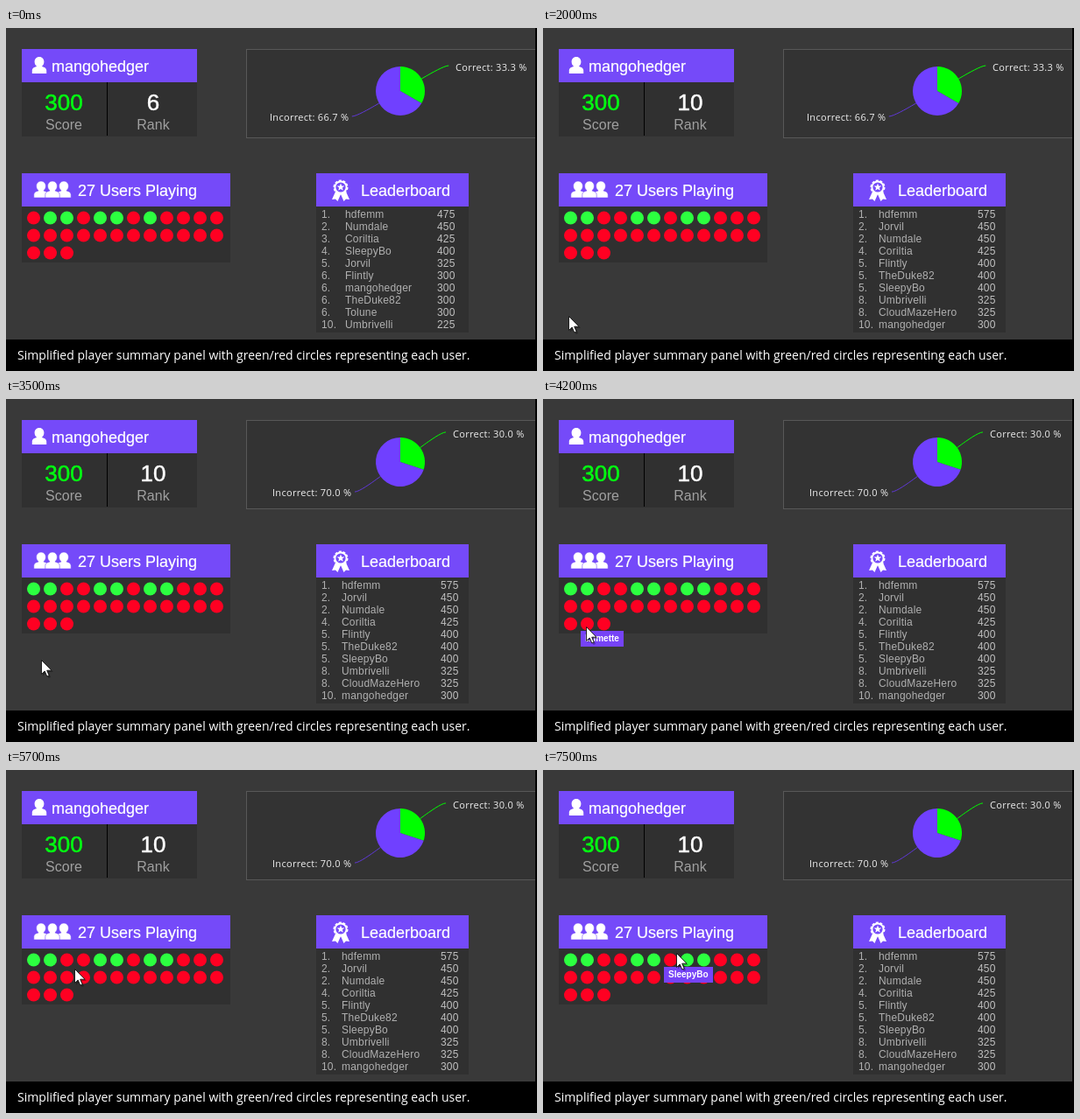
These frames come from a looping animation (606 px wide and 392 px high, 7.6 s). An HTML page:

```html
<!DOCTYPE html>
<html lang="en">
<head>
<meta charset="utf-8">
<title>Player summary panel</title>
<style>
  html, body { margin: 0; width: 100%; height: 100%; overflow: hidden; background: #393939; }
  #stage { position: relative; width: 606px; height: 392px; overflow: hidden; }
  svg { position: absolute; left: 0; top: 0; display: block; }
  text { font-family: "Liberation Sans", Arial, sans-serif; white-space: pre; }
  .head { fill: #754af9; }
  .body { fill: #303030; }
  .title { font-size: 18px; fill: #fff; stroke: #fff; stroke-width: .2px; }
  .big { font-size: 26px; text-anchor: middle; stroke-width: .5px; }
  .small { font-size: 16px; fill: #a0a0a0; text-anchor: middle; }
  .row { font-size: 12px; letter-spacing: .2px; fill: #b0b0b0; }
  .score { fill: #c0c0c0; }
  .label { font: 11px "Open Sans", sans-serif; letter-spacing: .3px; fill: #eee; }
  .caption { font: 14px "Open Sans", sans-serif; letter-spacing: .015px; fill: #fff; }
  #tip {
    position: absolute; height: 18px; padding: 0 5px; background: #7643f7; color: #fff;
    font: bold 10px/18px "Liberation Sans", Arial, sans-serif; white-space: nowrap;
  }
</style>
</head>
<body>
<div id="stage">
  <svg width="606" height="392">
    <defs>
      <path id="person" d="M0 0c3.400 0 5.400 2.600 5.400 5.600 0 2.300-1 4.300-2.500 5.300 3 .7 5.300 1.900 5.300 4.600V19H-8.200V15.500c0-2.700 2.300-3.900 5.300-4.600C-4.400 9.900-5.400 7.900-5.400 5.600-5.400 2.600-3.400 0 0 0z"/>
    </defs>
    <rect width="606" height="392" fill="#393939"/>

    <rect class="body" x="18" y="62" width="200" height="62"/>
    <rect class="head" x="18" y="24" width="200" height="38"/>
    <use href="#person" x="38" y="33" fill="#fff"/>
    <text class="title" x="52" y="50">mangohedger</text>
    <rect x="115" y="62" width="1" height="61" fill="#000"/>
    <text class="big" x="66" y="94" fill="#0f1" stroke="#0f1">300</text>
    <text class="small" x="66" y="116">Score</text>
    <text class="big" id="rank" x="168" y="94" fill="#fff" stroke="#fff"></text>
    <text class="small" x="168" y="116">Rank</text>

    <rect x="274.500" y="24.500" width="334" height="101" fill="#333" stroke="#585858"/>
    <g id="pie"><path fill="#0f0"/><path fill="#7040ff"/></g>
    <g id="labels"></g>

    <rect class="body" x="18" y="204" width="238" height="64"/>
    <rect class="head" x="18" y="166" width="238" height="38"/>
    <g fill="#fff" stroke="#754af9" stroke-width=".6">
      <use href="#person" x="40" y="175"/>
      <use href="#person" x="66" y="175"/>
      <use href="#person" x="53" y="175"/>
    </g>
    <text class="title" x="82" y="192">27 Users Playing</text>
    <g id="dots"></g>

    <rect class="body" x="354" y="204" width="174" height="144"/>
    <rect class="head" x="354" y="166" width="174" height="38"/>
    <path fill="#fff" d="M376 187l-4 9 4-.5 2.500 2.500 3.500-8 3.500 8 2.500-2.500 4 .5-4-9z"/>
    <circle cx="382" cy="182" r="7.500" fill="#fff" stroke="#fff" stroke-width="2" stroke-dasharray="3 1.700"/>
    <circle cx="382" cy="182" r="5.600" fill="#754af9"/>
    <path id="star" fill="#fff"/>
    <text class="title" x="405" y="192">Leaderboard</text>
    <g id="board"></g>
  </svg>
  <div id="tip"></div>
  <svg width="606" height="392">
    <g id="cursor">
      <path d="M2 2V18.500L6 15l2.500 6 2.500-1-2.500-6h5.500z" fill="#000" opacity=".3"/>
      <path d="M.5.5V16.500L4.200 13l2.600 6 2.400-1-2.500-5.800H12z" fill="#fff" stroke="#111" stroke-width=".9"/>
    </g>
    <rect y="356" width="606" height="36"/>
    <rect x="604" width="2" height="392"/>
    <text class="caption" x="13" y="379">Simplified player summary panel with green/red circles representing each user.</text>
  </svg>
</div>
<script>
const LOOP = 7600, STEP = 100;
const UPDATE = 1700, CLEAR = 2100, GROW = 2200, GROW_MS = 780, LABELS = 3100;
const CX = 450, CY = 72, RADIUS = 28;
const $ = id => document.getElementById(id);

const before = {
  rank: 6, share: 1 / 3, green: [1, 2, 4, 5, 7], nameX: 387, scoreX: 492,
  rows: `1 hdfemm 475,2 Numdale 450,3 Coriltia 425,4 SleepyBo 400,5 Jorvil 325,
    6 Flintly 300,6 mangohedger 300,6 TheDuke82 300,6 Tolune 300,10 Umbrivelli 225`,
  right: 513, wrong: 301
};
const after = {
  rank: 10, share: .3, green: [0, 1, 4, 5, 7, 8], nameX: 383, scoreX: 496,
  rows: `1 hdfemm 575,2 Jorvil 450,2 Numdale 450,4 Coriltia 425,5 Flintly 400,
    5 TheDuke82 400,5 SleepyBo 400,8 Umbrivelli 325,8 CloudMazeHero 325,10 mangohedger 300`,
  right: 510, wrong: 304
};

// Users under the pointer's route, by circle index
const hoverNames = { 3: "Kestwin", 4: "Orlabee", 5: "Pindrop", 6: "SleepyBo", 14: "Tolune", 25: "Lumette" };

// Pointer route: time, x, y
const route = [
  [1600, 10, 352], [2000, 30, 330], [2200, 30, 330], [2800, 45, 320], [3100, 45, 319],
  [3800, 38, 286], [4100, 50, 261], [4700, 50, 261], [5400, 56, 247], [5700, 79, 228],
  [6200, 78, 227], [7000, 116.5, 214], [7400, 153, 210], [7600, 153, 210]
];

const dots = Array.from({ length: 27 }, (_, i) => ({ x: 31.5 + i % 12 * 19, y: 217 + Math.floor(i / 12) * 20 }));

$("star").setAttribute("d", "M" + Array.from({ length: 10 }, (_, i) => {
  const r = i % 2 ? 2 : 4.6, a = i * Math.PI / 5;
  return `${382 + r * Math.sin(a)} ${182 - r * Math.cos(a)}`;
}).join("L") + "z");

// Point at a fraction of the turn, clockwise from the top
function polar(turn, r) {
  const a = turn * 2 * Math.PI;
  return [CX + r * Math.sin(a), CY - r * Math.cos(a)];
}

function slice(from, to, r) {
  return `M${CX} ${CY}L${polar(from, r)}A${r} ${r} 0 ${to - from > .5 ? 1 : 0} 1 ${polar(to, r)}z`;
}

function drawPie(share, p) {
  const [right, wrong] = $("pie").children, r = RADIUS * p;
  right.setAttribute("d", slice(0, share * p, r));
  wrong.setAttribute("d", slice(share * p, p, r));
}

function pieLabel(turn, side, color, textX, text) {
  const [x, y] = polar(turn, RADIUS + 30);
  return `<path fill="none" stroke="${color}" d="M${x + 5 * side} ${y}C${x} ${y} ${polar(turn, RADIUS + 12)} ` +
    `${polar(turn, RADIUS + 6)}L${polar(turn, RADIUS)}"/>` +
    `<text class="label" x="${textX}" y="${Math.round(y + (side > 0 ? 6 : 5))}">${text} %</text>`;
}

let shown;
function showData(data) {
  if (shown === data) return;
  shown = data;
  $("rank").textContent = data.rank;
  $("dots").innerHTML = dots.map((d, i) =>
    `<circle cx="${d.x}" cy="${d.y}" r="7.5" fill="${data.green.includes(i) ? "#2cff40" : "#ff0022"}"/>`).join("");
  $("board").innerHTML = data.rows.split(",").map((row, i) => {
    const [rank, name, score] = row.trim().split(" "), y = 217 + 14 * i;
    return `<text class="row" x="360" y="${y}">${rank}.</text>
      <text class="row" x="${data.nameX}" y="${y}">${name}</text>
      <text class="row score" x="${data.scoreX}" y="${y}">${score}</text>`;
  }).join("");
}

let labelled;
function showLabels(data) {
  if (labelled === data) return;
  labelled = data;
  const percent = f => (f * 100).toFixed(1);
  $("labels").innerHTML = data
    ? pieLabel(data.share / 2, 1, "#0f0", data.right, `Correct: ${percent(data.share)}`) +
      pieLabel((1 + data.share) / 2, -1, "#6038d8", data.wrong, `Incorrect: ${percent(1 - data.share)}`)
    : "";
}

function pointer(t) {
  const i = route.findIndex(k => k[0] > t);
  if (i < 1) return null;
  const [t0, x0, y0] = route[i - 1], [t1, x1, y1] = route[i];
  const u = (t - t0) / (t1 - t0), e = u * u * (3 - 2 * u);
  return { x: x0 + (x1 - x0) * e, y: y0 + (y1 - y0) * e };
}

function drawPointer(pos) {
  $("cursor").style.display = pos ? "" : "none";
  if (pos) $("cursor").setAttribute("transform", `translate(${Math.round(pos.x) - 1} ${Math.round(pos.y) - 1})`);
  const hit = pos ? dots.findIndex(d => Math.abs(d.x - pos.x) <= 8.5 && Math.abs(d.y - pos.y) <= 8.5) : -1;
  const name = hoverNames[hit], tip = $("tip");
  tip.style.display = name ? "" : "none";
  if (!name) return;
  tip.textContent = name;
  tip.style.left = dots[hit].x - 7.5 + "px";
  tip.style.top = dots[hit].y + 8 + "px";
}

const start = performance.now();
function draw(now) {
  const elapsed = Math.max(0, now - start) % LOOP;
  const t = Math.floor(elapsed / STEP) * STEP;
  showData(t < UPDATE ? before : after);
  showLabels(t < CLEAR ? before : t < LABELS ? null : after);
  if (t < CLEAR) drawPie(before.share, 1);
  else {
    const u = Math.min(1, Math.max(0, (t - GROW) / GROW_MS));
    drawPie(after.share, .5 - Math.cos(u * Math.PI) / 2);
  }
  drawPointer(pointer(t));
  requestAnimationFrame(draw);
}
draw(start);
</script>
</body>
</html>
```
